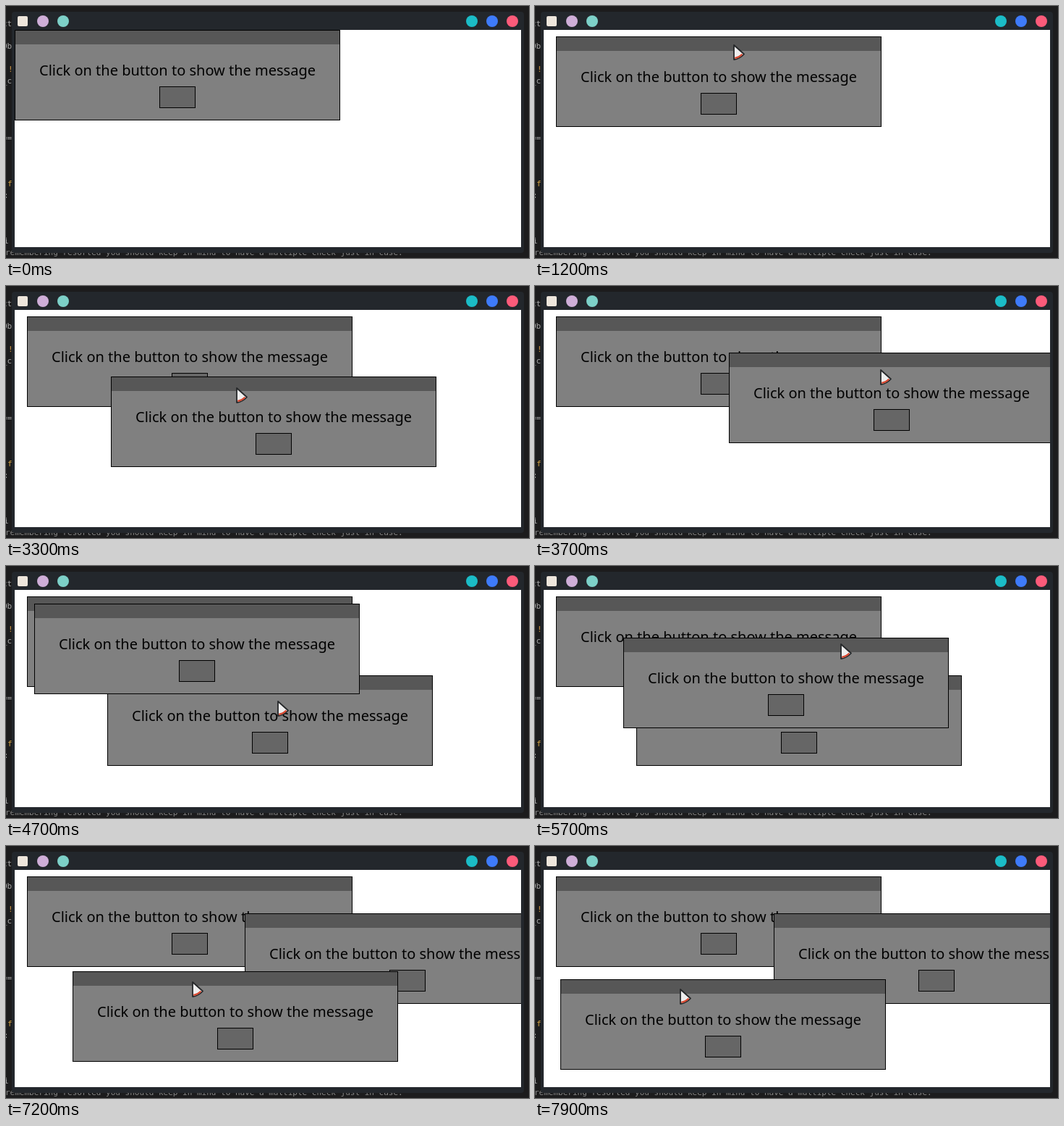
An HTML page for the animation above (8 s loop, 723x348 px).

```html
<!DOCTYPE html>
<html lang="en">
<head>
<meta charset="utf-8">
<title>Draggable message windows</title>
<style>
  html, body { margin: 0; width: 100%; height: 100%; overflow: hidden; background: #1c1c1d; }
  svg { display: block; width: 723px; height: 348px; }
  .code { font: 11px "DejaVu Sans Mono", monospace; fill: #a9a9a9; white-space: pre; }
  .label { font: 20px "Noto Sans", sans-serif; }
</style>
</head>
<body>
<svg viewBox="0 0 723 348">
  <defs>
    <clipPath id="client"><rect x="12" y="33" width="700" height="300"/></clipPath>
    <g id="panel">
      <rect x=".5" y=".5" width="449" height="124" fill="#808080" stroke="#000"/>
      <rect x="1" y="1" width="448" height="19" fill="#575757"/>
      <text class="label" x="34" y="63">Click on the button to show the message</text>
      <rect x="200.5" y="78.5" width="49" height="29" fill="#666" stroke="#000"/>
    </g>
  </defs>
  <rect width="723" height="348" fill="#1c1c1d"/>
  <g class="code">
    <text x="-5" y="28">ct</text>
    <text x="-5" y="59">Ob</text>
    <text x="3" y="91" fill="#d69a45">!</text>
    <text x="-5" y="107">_c</text>
    <text x="-5" y="186">==</text>
    <text x="2" y="249" fill="#d6a545">f</text>
    <text x="-3" y="265">:</text>
    <text x="-3" y="328">i</text>
    <text x="-1" y="344" fill="#858585">remembering resorted you should keep in mind to have a multiple check just in case.</text>
  </g>
  <rect x="8" y="8" width="708" height="333" rx="4" fill="#23272c"/>
  <rect x="16" y="14" width="14" height="14" rx="2" fill="#eee6dc"/>
  <g id="buttons"></g>
  <rect x="12" y="33" width="700" height="300" fill="#fff"/>
  <g clip-path="url(#client)">
    <g id="panels">
      <use id="first" href="#panel"/>
      <use id="second" href="#panel"/>
      <use id="third" href="#panel"/>
    </g>
    <g id="cursor" stroke-linejoin="round">
      <path d="M1 1L15 13.5Q9 20 1 21Z" fill="#eee" stroke="#26282a" stroke-width="1.8"/>
      <path d="M2.2 18.8Q8.5 18 12.4 13.6" fill="none" stroke="#d9472f" stroke-width="2.2"/>
    </g>
  </g>
</svg>
<script>
const LOOP = 8000, STEP = 100;
const RAISE_SECOND = 6900;
const byId = id => document.getElementById(id);
const panels = byId("panels");

const buttonColors = { 51: "#cfaed8", 79: "#7dd0c8", 644: "#1bbcc7", 672: "#3e7bfa", 700: "#fc5b7a" };
byId("buttons").innerHTML = Object.entries(buttonColors)
  .map(([x, color]) => `<circle cx="${x}" cy="21" r="8" fill="${color}"/>`).join("");

// Each key is [time, x, y]; a part stays hidden before its first key.
const firstPath = [[500, 12, 33], [900, 36, 41], [1200, 29, 42]];
const secondPath = [
  [1600, 39, 52], [2100, 39, 52], [2400, 45, 52], [3000, 143, 125],
  [3300, 145, 125], [3500, 30, 130], [3700, 268, 92], [3900, 172, 158],
  [4000, 140, 151], [6900, 140, 151], [7500, 43, 195], [7900, 35, 184]
];
const thirdPath = [
  [4500, 39, 52], [5500, 39, 52], [5900, 205, 145], [6100, 293, 125], [6500, 330, 93]
];
const cursorPath = [
  [200, 511, 125], [500, 257, 44], [1200, 274, 53], [1500, 258, 126],
  [1700, 281, 71], [2000, 270, 53], [2400, 260, 63], [3000, 378, 134],
  [3300, 318, 140], [3500, 270, 135], [3700, 477, 115], [3900, 385, 165],
  [4400, 262, 130], [4700, 375, 186], [5300, 329, 62], [5500, 329, 62],
  [5900, 515, 152], [6100, 596, 134], [6500, 620, 105], [6900, 305, 165],
  [7500, 208, 208], [7900, 200, 197]
];
const paths = { first: firstPath, second: secondPath, third: thirdPath, cursor: cursorPath };

// Steps at which the pointer rests and the picture is held.
const rests = new Set([1100, 1300, 1800, 2100, 4100, 4200, 5400, 5500, 6400, 6500, 7600]);

function positionAt(keys, time) {
  const next = keys.findIndex(key => key[0] > time);
  if (next < 0) return keys[keys.length - 1].slice(1);
  if (next === 0) return null;
  const [t0, x0, y0] = keys[next - 1];
  const [t1, x1, y1] = keys[next];
  const k = (time - t0) / (t1 - t0);
  return [Math.round(x0 + (x1 - x0) * k), Math.round(y0 + (y1 - y0) * k)];
}

function render(time) {
  while (rests.has(time)) time -= STEP;
  for (const [id, keys] of Object.entries(paths)) {
    const position = positionAt(keys, time) || (id === "first" && keys[0].slice(1));
    const part = byId(id);
    part.setAttribute("visibility", position ? "visible" : "hidden");
    if (position) part.setAttribute("transform", `translate(${position})`);
  }
  const top = byId(time >= RAISE_SECOND ? "second" : "third");
  if (panels.lastElementChild !== top) panels.append(top);
}

const start = performance.now();
function tick() {
  const time = (performance.now() - start) % LOOP;
  render(Math.floor(time / STEP) * STEP);
  requestAnimationFrame(tick);
}
tick();
</script>
</body>
</html>
```
